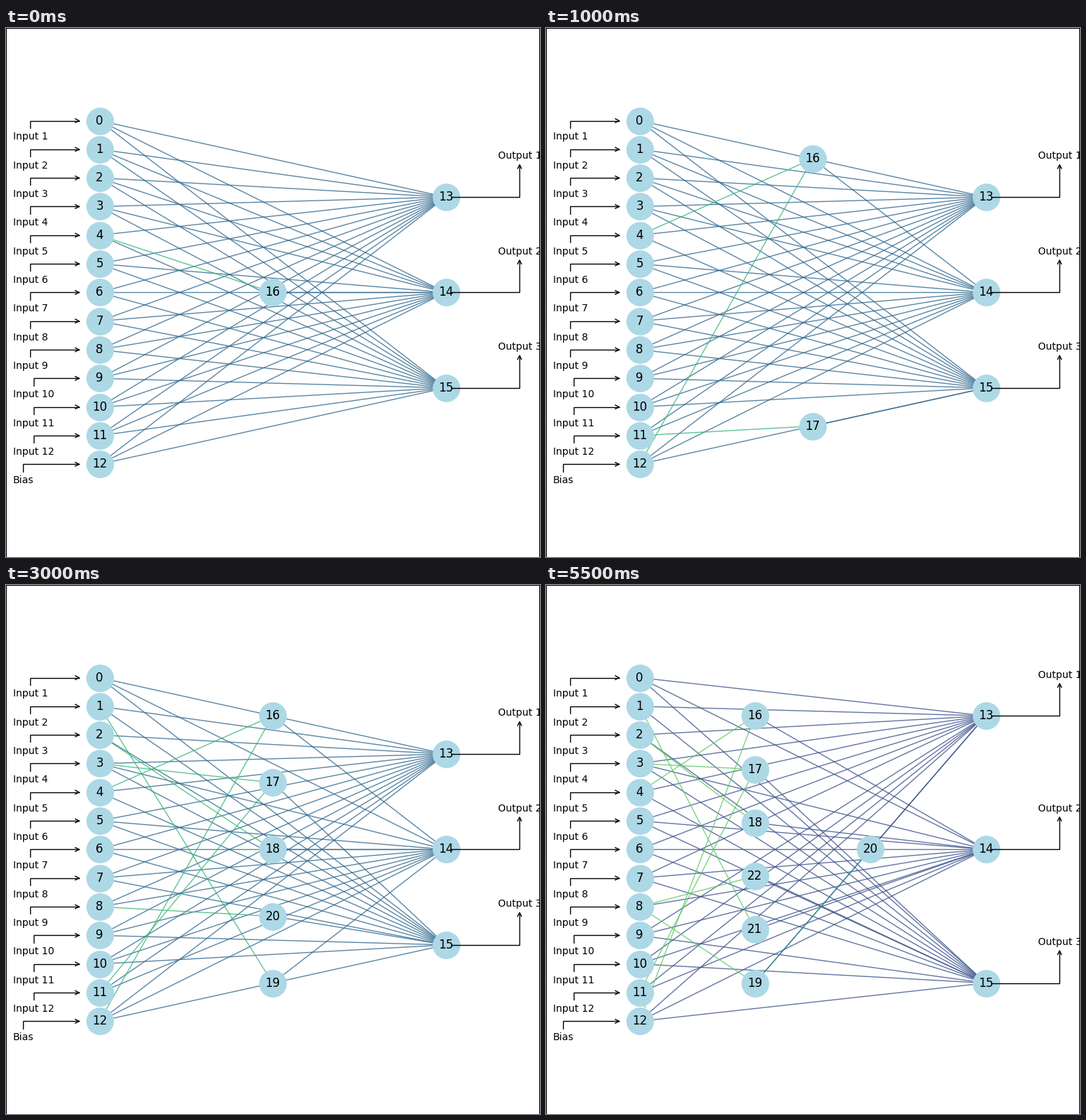
Recreate the animation shown at these times as a matplotlib script. Size 751 px wide and 745 px high, loop 8000 ms.

```python
import numpy as np
import matplotlib.pyplot as plt
from matplotlib.animation import FuncAnimation
from matplotlib.collections import LineCollection

W, H, DPI = 751, 745, 100
STEP_MS, STEPS = 500, 16
CX, CY = 375, 372.45
UX, UY = 243.5, 241.92  # half the width and height of the network
INPUTS, OUTPUTS = range(13), (13, 14, 15)

plt.rcParams["font.family"] = "DejaVu Sans"

# Each hidden node replaces one direct link (input, output), top to bottom.
BASE = {16: (4, 14), 17: (11, 15), 18: (2, 14)}
LINKS = [(12, 16), (3, 17)]

# (first step, hidden nodes, added links, nodes of a second hidden layer)
STATES = [
    (0, {16: (4, 14)}, [], []),
    (1, {16: (4, 14)}, LINKS[:1], []),
    (2, {16: (4, 14), 17: (11, 15)}, LINKS[:1], []),
    (3, BASE, LINKS, []),
    (5, {**BASE, 19: (8, 15)}, LINKS, []),
    (6, {**BASE, 20: (8, 15), 19: (1, 14)}, LINKS, []),
    (7, {**BASE, 21: (8, 15), 20: (1, 14), 19: (8, 13)}, LINKS, []),
    (11, {**BASE, 22: (8, 15), 21: (1, 14), 19: (8, 13)},
     LINKS + [(19, 20), (20, 13)], [20]),
]

fig = plt.figure(figsize=(W / DPI, H / DPI), dpi=DPI, facecolor="white")
ax = fig.add_axes([0, 0, 1, 1])


def column(nodes, x, spread):
    """Place nodes evenly in one column around the middle."""
    n = len(nodes)
    offsets = np.linspace(-spread, spread, n) * UY if n > 1 else [0]
    return {node: (x, CY + dy) for node, dy in zip(nodes, offsets)}


def note(text, pos, tip, corner, style, gap):
    """Label beside a node, joined to it by a right-angled arrow."""
    (x, y), (tx, ty), (lx, ly) = pos, tip, corner
    ax.annotate(text, xy=(x + tx * UX, y + ty * UY),
                xytext=(x + lx * UX, y + ly * UY), size=10,
                arrowprops=dict(
                    arrowstyle=style, shrinkA=gap,
                    connectionstyle="angle,angleA=90,angleB=0,rad=0"))


def draw_notes(pos):
    for i in INPUTS:
        name = "Bias" if i == 12 else f"Input {i + 1}"
        note(name, pos[i], (-0.1, 0), (-0.5, 0.111), "->", 2)
    for k, node in enumerate(OUTPUTS, 1):
        note(f"Output {k}", pos[node], (0.02, 0), (0.3, -0.222), "<-", 0.6)


def draw_edges(layers, pos, hidden, links):
    depth = {node: d for d, layer in enumerate(layers) for node in layer}
    split = set(hidden.values())
    edges = [(i, o) for i in INPUTS for o in OUTPUTS if (i, o) not in split]
    for node, (src, dst) in hidden.items():
        edges += [(src, node), (node, dst)]
    edges += links
    n = len(layers)
    colors = [plt.cm.viridis(1 - depth[b] / n) for _, b in edges]
    ax.add_collection(LineCollection(
        [(pos[a], pos[b]) for a, b in edges],
        colors=colors, linewidths=1, alpha=0.8, zorder=1), autolim=False)


def draw_nodes(pos):
    xs, ys = zip(*pos.values())
    ax.scatter(xs, ys, s=700, c="lightblue", linewidths=1.5, zorder=2)
    for node, (x, y) in pos.items():
        ax.text(x, y, str(node), size=12, ha="center", va="center", zorder=3)


def draw(step):
    _, hidden, links, deep = [s for s in STATES if s[0] <= step][-1]
    ax.clear()
    ax.set(xlim=(0, W), ylim=(H, 0), autoscale_on=False)
    ax.axis("off")

    layers = [list(INPUTS), list(hidden)] + ([deep] if deep else [])
    layers.append(list(OUTPUTS))
    spreads = [1] + [7 / 9] * (len(layers) - 2) + [7 / 9 if deep else 5 / 9]
    xs = np.linspace(CX - UX, CX + UX, len(layers))
    pos = {}
    for nodes, x, spread in zip(layers, xs, spreads):
        pos.update(column(nodes, x, spread))

    draw_edges(layers, pos, hidden, links)
    draw_nodes(pos)
    draw_notes(pos)
    # The border is open at the bottom; lines snap to whole pixels.
    ax.plot([0, 0, W - 1, W - 1], [H + 2, 0, 0, H + 2],
            color="black", lw=0.8, zorder=5, clip_on=False)
    return []


anim = FuncAnimation(fig, draw, frames=STEPS, interval=STEP_MS,
                     init_func=lambda: [], repeat=True, repeat_delay=0)
plt.show()
```
